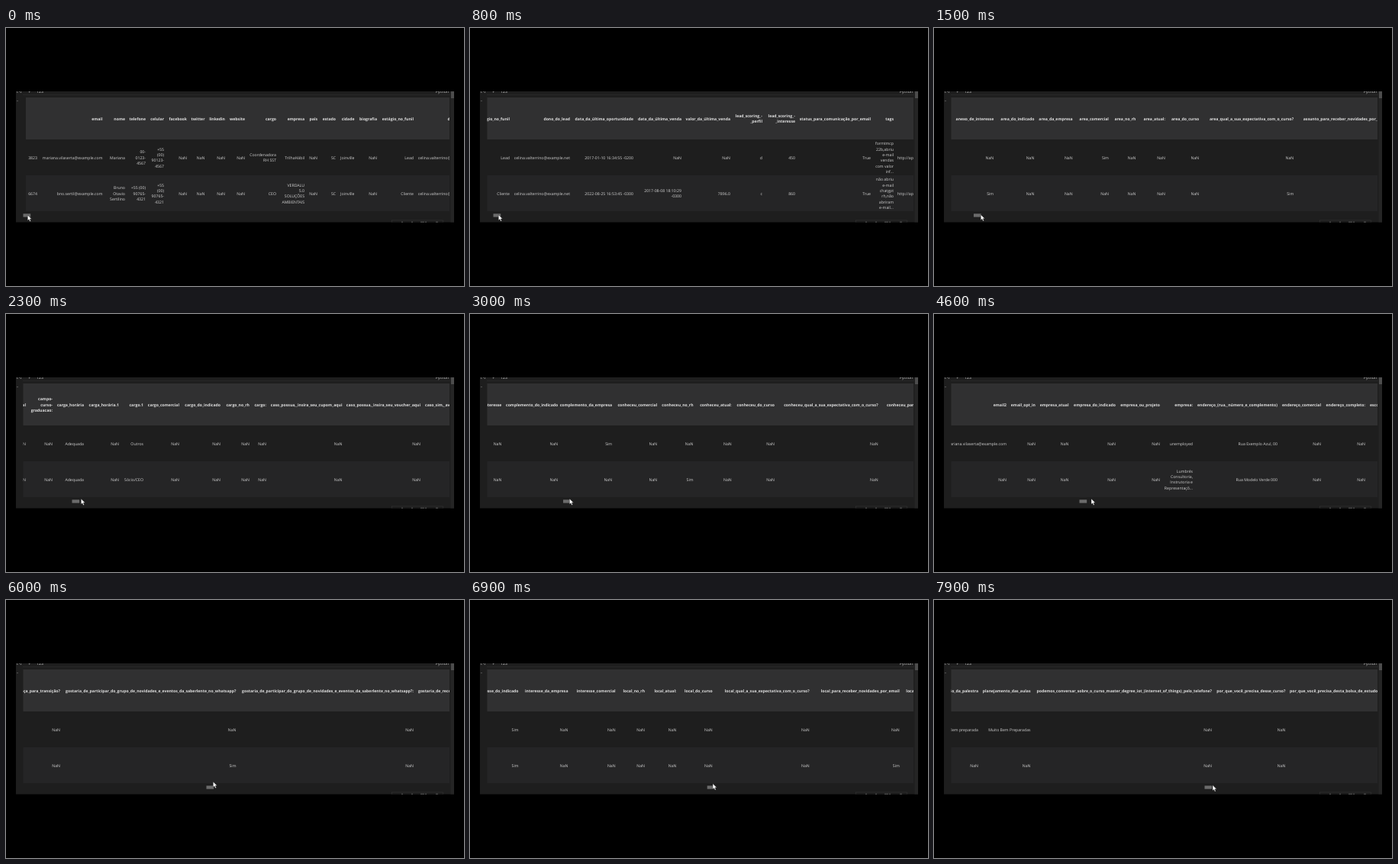
An HTML page for the animation above (8000 ms loop, 600x338 px).

```html
<!DOCTYPE html>
<html lang="pt-BR">
<head>
<meta charset="utf-8">
<title>Tabela de leads</title>
<style>
  html, body { margin: 0; width: 100%; height: 100%; overflow: hidden; background: #000; }
  svg { display: block; width: 100vw; height: 100vh; }
  text { font: 5.18px "Open Sans", "Noto Sans", sans-serif; fill: #d2d2d2; text-rendering: geometricPrecision; white-space: pre; }
  .head { font-size: 5.15px; font-weight: 700; fill: #e2e2e2; }
</style>
</head>
<body>
<svg viewBox="0 0 600 338">
  <defs>
    <clipPath id="panel"><rect x="13" y="83" width="574" height="171.5"/></clipPath>
    <clipPath id="view"><rect x="22.5" y="91" width="558.5" height="150"/></clipPath>
  </defs>
  <g clip-path="url(#panel)">
    <rect x="13" y="83" width="574" height="172" fill="#1e1e1e"/>
    <path d="M22 87.5H582" stroke="#272727"/>
    <text x="14" y="84.2">[1]</text>
    <text x="29" y="84.6">✓</text>
    <text x="40" y="84.8">123</text>
    <text x="563" y="84.6">Python</text>
    <text x="13.5" y="95.5">..</text>
    <g clip-path="url(#view)">
      <g id="table">
        <rect x="26" y="91" width="34000" height="55" fill="#303031"/>
        <rect x="26" y="193" width="34000" height="47" fill="#252526"/>
      </g>
    </g>
    <rect x="582.5" y="83" width="4.5" height="172" fill="#252525"/>
    <rect x="583" y="83" width="4" height="9" fill="#4c4c4c"/>
    <rect x="505.5" y="252" width="67" height="9" fill="#1c1c1c" stroke="#333" stroke-width=".7"/>
    <path d="M518 254.3h2M531 254.3h2M543 254.3h5M549 254.3h2M563 254.3h3" stroke="#888"/>
    <rect id="thumb" x="22.5" y="243.3" width="9.7" height="4.3" fill="#6b6b6b"/>
  </g>
  <path id="cursor" d="M0 0V7.3L1.7 5.8 2.9 8.5 4.2 7.9 3 5.3H5.3Z" fill="#fff" stroke="#111" stroke-width=".4"/>
</svg>
<script>
const NS = 'http://www.w3.org/2000/svg';
const table = document.getElementById('table');
const thumb = document.getElementById('thumb');
const cursor = document.getElementById('cursor');
const LINE = 7.35, ROWS = [118.5, 169.5, 216.5], SCROLL_PER_PX = 60;

// Lines are split by "|"; a leading ">" aligns the text to the left.
function addText(x, middle, content, bold) {
  const fromLeft = content[0] === '>';
  const lines = content.replace(/^>/, '').split('|');
  lines.forEach((line, i) => {
    const el = document.createElementNS(NS, 'text');
    el.setAttribute('x', x);
    el.setAttribute('y', middle + 2.1 + (i - (lines.length - 1) / 2) * LINE);
    el.setAttribute('text-anchor', fromLeft ? 'start' : 'end');
    if (bold) el.setAttribute('class', 'head');
    el.textContent = line;
    table.append(el);
  });
}

function addColumn(x, head, a = 'NaN', b = 'NaN') {
  [head, a, b].forEach((content, row) => addText(x, ROWS[row], content, row === 0));
}

// Each section: scroll offset, columns [edge, header, first row, second row], words of the columns after it.
const sections = [
  [0, [
    [41, '', '3823', '6674'],
    [126.5, 'email', 'mariana.vilaserta@example.com', 'bno.sertil@example.com'],
    [156, 'nome', 'Mariana', 'Bruno|Otavio|Sertilino'],
    [183, 'telefone', '00-|0123-|4567', '+55 (00)|90765-|4321'],
    [207, 'celular', '+55|(00)|90123-|4567', '+55|(00)|90765-|4321'],
    [237, 'facebook'], [260.5, 'twitter'], [287, 'linkedin'], [313, 'website'],
    [354, 'cargo', 'Coordenadora|RH SST', 'CEO'],
    [391, 'empresa', 'TrilhaHábil', 'VERDALU|5.0|SOLUÇÕES|AMBIENTAIS'],
    [408, 'país'], [432, 'estado', 'SC', 'SC'], [456.5, 'cidade', 'Joinville', 'Joinville'],
    [486, 'biografia'], [534, 'estágio_no_funil', 'Lead', 'Cliente'],
    [613, 'dono_do_lead', 'celina.valterrino@example.net', 'celina.valterrino@example.net']
  ], ''],
  [482, [
    [214, 'data_da_última_oportunidade', '2017-01-10 16:34:55 -0200', '2022-08-25 16:53:45 -0300'],
    [277, 'data_da_última_venda', 'NaN', '2017-08-08 18:10:29|-0300'],
    [341, 'valor_da_última_venda', 'NaN', '7896.0'],
    [383, 'lead_scoring_-|_perfil', 'd', 'c'],
    [426, 'lead_scoring_-|_interesse', '450', '860'],
    [525, 'status_para_comunicação_por_email', 'True', 'True'],
    [555, 'tags', 'formtmcp|22b,abriu|e-mail|vendas|com valor|inf...', 'não abriu|e-mail|chatgpt|rh,não|abriram|e-mail...'],
    [655, 'url_pública', 'http://app.example.com/leads/3823456', 'http://app.example.com/leads/6674456']
  ], 'ano anexo area assunto bairro busca campanha campo'],
  [3840, [
    [26, 'campo_atual'],
    [61, 'campo-|curso-|graduacao:'],
    [102, 'carga_horária', 'Adequada', 'Adequada'],
    [148, 'carga_horária.1'],
    [180, 'cargo.1', 'Outros', 'Sócio/CEO'],
    [227, 'cargo_comercial'], [281, 'cargo_do_indicado'], [319, 'cargo_no_rh'], [341, 'cargo:'],
    [440.5, 'caso_possua,_insira_seu_cupom_aqui'],
    [543, 'caso_possua,_insira_seu_voucher_aqui'],
    [549, '>caso_sim,_avise_o_nome_da_empresa', '>', '>']
  ], 'celular cep cidade complemento conheceu conteúdo cpf curso'],
  [7800, [
    [30, 'curso_de_formação', 'Med', 'Civil'],
    [88, 'curso_de_graduação'], [142, 'curso_de_interesse'], [196, 'curso_de_interesse'],
    [251, 'curso_de_interesse:', 'live-do-rh-|tradicional-ao-rh-|agil', 'curso-gratuito-|white-belt'],
    [291, 'curso_online:'], [350, 'código_promocional'],
    [574, 'dados_para_emissão_do_boleto_(razão_social,_cnpj,_endereço_e_email_do_financeiro)'],
    [580, '>data_da_inscrição', '>', '>']
  ], 'data desafio deseja dia disciplina dúvida'],
  [10080, [
    [95, 'email2', 'mariana.vilaserta@example.com'],
    [133, 'email_opt_in'], [176.5, 'empresa_atual'], [238, 'empresa_do_indicado'], [296, 'empresa_ou_projeto'],
    [339, 'empresa:', 'unemployed', 'Lumbrés|Consultoria,|Instrutoria e|Representaçõ...'],
    [450, 'endereço_(rua,_número_e_complemento)', 'Rua Exemplo Azul, 00', 'Rua Modelo Verde 000'],
    [507, 'endereço_comercial'], [565, 'endereço_completo:'],
    [571, '>escolaridade', '>', '>']
  ], 'estado evento experiência faixa foco forma função'],
  [14400, [
    [71, 'falta_segurança_para_transição?'],
    [301.5, 'gostaria_de_participar_do_grupo_de_novidades_e_eventos_da_saberlente_no_whatsapp?', 'NaN', 'Sim'],
    [534, 'gostaria_de_participar_do_grupo_de_novidades_e_eventos_da_saberlente_no_whatsapp?:'],
    [540, '>gostaria_de_receber_novidades?', '>', '>']
  ], 'grau horário idade instrutor interesse local motivo nota objetivo organização'],
  [19920, [
    [58, 'organização_da_palestra', 'Bem preparada'],
    [126.5, 'planejamento_das_aulas', 'Muito Bem Preparadas'],
    [364, 'podemos_conversar_sobre_o_curso_master_degree_iot_(internet_of_things)_pelo_telefone?'],
    [460.5, 'por_que_você_precisa_desse_curso?'],
    [466, '>por_que_você_precisa_desta_bolsa_de_estudos?', '>', '>']
  ], '']
];

const endings = ['de_interesse', 'comercial', 'do_curso', 'que_mais_combina_com_você?', 'da_empresa', 'atual:',
  'para_receber_novidades_por_email', 'do_indicado', 'no_rh', 'qual_a_sua_expectativa_com_o_curso?'];
const widthOf = s => s.replace('>', '').length * 2.95;

function fillGap(from, to, words) {
  let x = from;
  for (let i = 0; ; i++) {
    const word = words[Math.floor((x - from) / (to - from) * words.length)];
    const head = word + '_' + endings[i * 7 % endings.length];
    x += widthOf(head) + 6;
    if (x > to) return;
    addColumn(x, head, i % 9 === 4 ? 'Sim' : 'NaN', i % 7 === 3 ? 'Sim' : 'NaN');
  }
}

sections.forEach(([offset, columns, words], i) => {
  columns.forEach(([x, ...cells]) => addColumn(x + offset, ...cells));
  if (!words) return;
  const [lastX, lastHead] = columns[columns.length - 1];
  const [nextOffset, [[nextX, nextHead, nextCell = '']]] = sections[i + 1];
  const from = offset + lastX + (lastHead[0] === '>' ? widthOf(lastHead) : 0) + 6;
  fillGap(from, nextOffset + nextX - Math.max(widthOf(nextHead), widthOf(nextCell)) - 6, words.split(' '));
});

// time, scroll, cursor x, cursor y
const keys = [
  [0, 0, 28.3, 245], [300, 0, 28.3, 245], [800, 482, 37.3, 244.7], [1300, 1250, 52, 245],
  [2300, 3840, 98.3, 242], [3600, 7800, 157.8, 241.8], [3800, 7800, 157.8, 241.8],
  [4600, 10080, 206, 242], [5500, 13300, 251, 240], [5700, 13300, 251, 240],
  [6000, 14400, 271.3, 238], [7400, 18900, 344, 242], [7600, 18900, 344, 242], [7900, 19920, 365, 242.5]
];

function poseAt(t) {
  const next = Math.max(1, keys.findIndex(k => k[0] >= t));
  const a = keys[next - 1], b = keys[next];
  const p = (t - a[0]) / (b[0] - a[0]);
  return a.map((v, i) => v + (b[i] - v) * p);
}

const start = performance.now();
function draw() {
  const t = Math.max(0, performance.now() - start) % 8000;
  const [, scroll, x, y] = poseAt(Math.floor(t / 100) * 100);
  table.setAttribute('transform', `translate(${-scroll} 0)`);
  thumb.setAttribute('x', 22.5 + scroll / SCROLL_PER_PX);
  cursor.setAttribute('transform', `translate(${x} ${y})`);
  requestAnimationFrame(draw);
}
draw();
</script>
</body>
</html>
```
